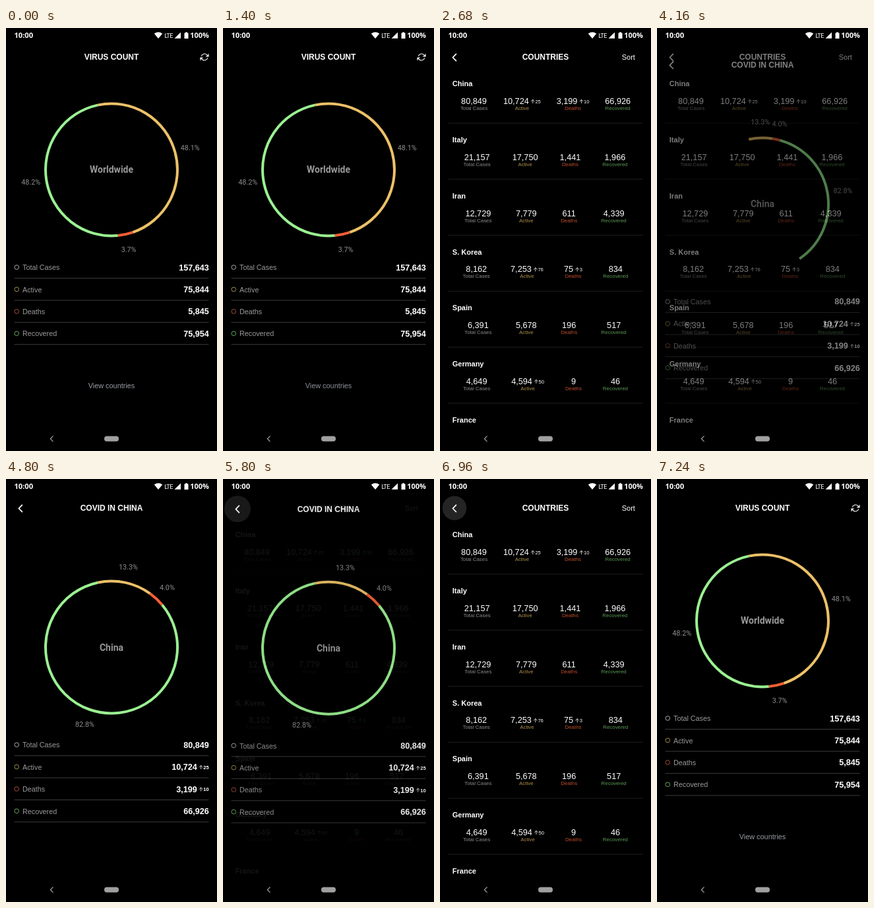
An HTML page for the animation above (9480 ms loop, 320 px wide and 640 px high).

```html
<!DOCTYPE html>
<html lang="en">
<head>
<meta charset="utf-8">
<title>Virus count</title>
<style>
  html, body { margin: 0; width: 100%; height: 100%; overflow: hidden; background: #000; }
  svg { display: block; width: 100vw; height: 100vh; }
  text { font-family: "Liberation Sans", Arial, sans-serif; white-space: pre; }
  .roboto { font-family: Roboto, sans-serif; }
  .status { font-family: "Open Sans", sans-serif; }
</style>
</head>
<body>
<svg id="stage" viewBox="0 0 320 640"></svg>
<script>
const LOOP = 9480;
const YELLOW = '#ecc168', RED = '#f65f34', GREEN = '#9bf192';
const START = -12, RADIUS = 100, LABEL_RADIUS = 123.7;
const SHIFT = 44;

const pen = document.createElement('canvas').getContext('2d');
const clamp = v => Math.max(0, Math.min(1, v));
const part = (t, from, length) => clamp((t - from) / length);
const smooth = v => v * v * (3 - 2 * v);
const mix = (a, b, v) => a + (b - a) * v;

function widthOf(str, size, weight = 400) {
  pen.font = `${weight} ${size}px "Liberation Sans", Arial, sans-serif`;
  return pen.measureText(str).width;
}

function text(str, x, y, size, o = {}) {
  const { fill = '#fff', anchor = 'start', weight = 400, cls = '', extra = '' } = o;
  return `<text x="${x}" y="${y}" font-size="${size}" font-weight="${weight}" fill="${fill}"
    text-anchor="${anchor}" class="${cls}" ${extra}>${str}</text>`;
}

const line = (y, color) => `<path d="M12.5 ${y}H307.5" stroke="${color}" stroke-width="1"/>`;
const stroke = (d, width, color = '#fff') =>
  `<path d="${d}" fill="none" stroke="${color}" stroke-width="${width}" stroke-linecap="round" stroke-linejoin="round"/>`;
const arrow = (x, y) => stroke(`M${x} ${y + 2.6}V${y - 2.6}M${x - 2.5} ${y - .1}L${x} ${y - 2.6}L${x + 2.5} ${y - .1}`, .9, '#ddd');
const title = str => text(str, 160, 48.3, 12, { anchor: 'middle', weight: 700 });
const back = id => `<circle id="${id}" cx="22" cy="44" r="0" fill="#fff"/>` + stroke('M24.4 39.3L19.4 44.5L24.4 49.7', 1.7);

// A number, optionally followed by a small arrow and its increase.
const DELTA = 7.6, ARROW_SPACE = 9.6;
function figure(str, x, y, size, weight) {
  const [num, inc] = str.split('+');
  const w = widthOf(num, size, weight);
  let out = text(num, x, y, size, { weight });
  if (inc) out += arrow(x + w + 6, y - 4) + text(inc, x + w + ARROW_SPACE, y - 1.2, DELTA, { weight });
  return out;
}
function figureWidth(str, size, weight) {
  const [num, inc] = str.split('+');
  return widthOf(num, size, weight) + (inc ? ARROW_SPACE + widthOf(inc, DELTA, weight) : 0);
}

// ----- summary with ring -----
const NAMES = ['Total Cases', 'Active', 'Deaths', 'Recovered'];
const DOTS = ['#a8a8a8', '#a09050', '#a44c38', '#66a860'];

function summary(name, values, top) {
  const rows = values.map((v, i) => {
    const y = top + i * 33.4;
    const w = figureWidth(v, 12.6, 700);
    return `<circle cx="16.2" cy="${y - .2}" r="3.3" fill="none" stroke="${DOTS[i]}" stroke-width="1"/>`
      + text(NAMES[i], 25, y + 4, 10.8, { fill: '#999' })
      + figure(v, 307.7 - w, y + 4.4, 12.6, 700)
      + line(y + 16.4, '#3c3c3c');
  }).join('');
  return rows + text(name, 160, top - 142.8, 14, { cls: 'roboto', weight: 700, fill: '#999', anchor: 'middle' });
}

function polar(cy, r, deg) {
  const a = deg * Math.PI / 180;
  return [160 + r * Math.sin(a), cy - r * Math.cos(a)];
}
const at = p => p.map(v => v.toFixed(2)).join(' ');

function arc(cy, from, to, color) {
  const big = to - from > 180 ? 1 : 0;
  return `<path d="M${at(polar(cy, RADIUS, from))}A${RADIUS} ${RADIUS} 0 ${big} 1 ${at(polar(cy, RADIUS, to))}"
    fill="none" stroke="${color}" stroke-width="4"/>`;
}

function ring(cy, shares, grown = 1) {
  if (grown <= 0) return '';
  let angle = START, out = '';
  const total = shares.reduce((sum, s) => sum + s[0], 0);
  for (const [share, color] of shares) {
    const next = angle + share / total * 360 * grown;
    const [x, y] = polar(cy, LABEL_RADIUS, (angle + next) / 2);
    out += arc(cy, angle, next, color)
      + text(share.toFixed(1) + '%', x, y + 3.6, 10.8, { cls: 'roboto', fill: '#8c8c8c', anchor: 'middle' });
    angle = next;
  }
  return out;
}

// ----- country list -----
const COUNTRIES = [
  ['China', '80,849', '10,724+25', '3,199+10', '66,926'],
  ['Italy', '21,157', '17,750', '1,441', '1,966'],
  ['Iran', '12,729', '7,779', '611', '4,339'],
  ['S. Korea', '8,162', '7,253+76', '75+3', '834'],
  ['Spain', '6,391', '5,678', '196', '517'],
  ['Germany', '4,649', '4,594+50', '9', '46'],
  ['France']
];
const TINTS = ['#8c8c8c', '#b0924a', '#c04c2c', '#5a9a54'];

function country([name, ...values], i) {
  const y = i * 84.75;
  let out = text(name, 18.8, y + 88.4, 11, { weight: 700 });
  if (values.length) {
    const widths = values.map((v, k) => Math.max(figureWidth(v, 12.7), widthOf(NAMES[k], 7.9)));
    const gap = (282 - widths.reduce((a, b) => a + b)) / 4;
    let x = 19 + gap / 2;
    values.forEach((v, k) => {
      const mid = x + widths[k] / 2;
      out += figure(v, mid - figureWidth(v, 12.7) / 2, y + 115.1, 12.7)
        + text(NAMES[k], mid, y + 124, 7.9, { fill: TINTS[k], anchor: 'middle' });
      x += widths[k] + gap;
    });
  }
  return `<g id="row${i}">${out}</g>` + line(y + 144, '#1e1e1e');
}

// ----- fixed system bars -----
const statusBar = text('10:00', 12.4, 14.9, 11.2, { cls: 'status', weight: 700 })
  + '<path d="M231 16L224.8 8.6Q231 4 237.2 8.6Z" fill="#fff"/>'
  + text('LTE', 240.2, 14.7, 9.2, { cls: 'roboto', extra: 'letter-spacing="-.6"' })
  + '<path d="M255.5 15.8H265V6.4Z" fill="#fff"/>'
  + '<path d="M270.5 7.4H272.2V6.2H274.8V7.4H276.5V16H270.5Z" fill="#fff"/>'
  + text('100%', 307.8, 14.9, 10.9, { cls: 'status', weight: 700, anchor: 'end' });
const navBar = stroke('M71.2 617.6L67.4 621.5L71.2 625.4', 1.3, '#989898')
  + '<rect x="149" y="617.6" width="22" height="7.8" rx="3.9" fill="#a0a0a0"/>';

const refresh = `<g transform="translate(294.4 37.4) scale(.55)">${stroke(
  'M23 4V10H17M1 20V14H7M3.51 9A9 9 0 0 1 18.36 5.64L23 10M1 14L5.64 18.36A9 9 0 0 0 20.49 15', 2)}</g>`;

const WORLD = [[48.1, YELLOW], [3.7, RED], [48.2, GREEN]];
const CHINA = [[13.3, YELLOW], [4.0, RED], [82.8, GREEN]];
const cover = '<rect width="320" height="640"/>';

document.getElementById('stage').innerHTML = `
  <rect width="320" height="640"/>
  <clipPath id="view"><rect width="320" height="603"/></clipPath>
  <g clip-path="url(#view)">
    <g>${title('VIRUS COUNT')}${refresh}${ring(214.4, WORLD)}
      ${summary('Worldwide', ['157,643', '75,844', '5,845', '75,954'], 362.2)}
      <g id="link">${text('View countries', 160, 545, 10.9, { fill: '#989ca4', anchor: 'middle' })}</g>
    </g>
    <g id="countries">${cover}${back('ripple1')}${title('COUNTRIES')}
      ${text('Sort', 285.8, 48, 11, { anchor: 'middle' })}
      <g id="loader">
        <path id="spinner" fill="none" stroke="#fff" stroke-width="3"/>
        ${text('Fetching latest updates', 160, 354.9, 10.83, { anchor: 'middle' })}
        ${text('Source: worldometers.info', 160, 368.4, 9.3, { fill: '#999', anchor: 'middle' })}
      </g>
      <g id="list">${COUNTRIES.map(country).join('')}</g>
    </g>
    <g id="detail">${cover}${back('ripple2')}${title('COVID IN CHINA')}
      <g id="chinaRing"></g>
      ${summary('China', COUNTRIES[0].slice(1), 402.3)}
    </g>
  </g>
  ${statusBar}${navBar}`;

const el = {};
for (const node of document.querySelectorAll('[id]')) el[node.id] = node;
const show = (node, on) => node.setAttribute('display', on ? 'inline' : 'none');

// Screens rise and fade in, then drop and fade out.
function screen(node, t, open, close) {
  const shown = t < close
    ? 1 - (1 - part(t, open, 350)) ** 5
    : 1 - part(t, close, 150) ** 4;
  const alpha = shown < .5 ? shown / 2
    : shown < .9 ? mix(.25, .7, (shown - .5) / .4)
    : mix(.7, 1, (shown - .9) / .1);
  show(node, shown > 0);
  node.setAttribute('opacity', alpha);
  node.setAttribute('transform', `translate(0 ${SHIFT * (1 - shown)})`);
}

function press(node, t, from) {
  const down = smooth(part(t, from - 20, 100)) - smooth(part(t, from + 90, 170));
  node.setAttribute('opacity', 1 - .6 * down);
}

function ripple(node, t, from) {
  const grow = part(t, from - 30, 180);
  node.setAttribute('r', 20 * Math.sqrt(grow));
  node.setAttribute('opacity', grow > 0 ? .14 * (1 - part(t, from + 120, 200)) : 0);
}

function spin(t) {
  const u = Math.max(0, t - 1380) / 1333;
  const turn = 45 + (t - 1680) * .23;
  const tail = turn + 270 * smooth(clamp(2 * u - 1));
  const head = turn + 6 + 270 * smooth(clamp(2.85 * u));
  const p = deg => at(polar(312, 13.3, deg));
  el.spinner.setAttribute('d', `M${p(tail)}A13.3 13.3 0 ${head - tail > 180 ? 1 : 0} 1 ${p(head)}`);
}

function draw(t) {
  screen(el.countries, t, 1600, 6940);
  screen(el.detail, t, 4080, 5740);
  press(el.link, t, 1400);
  press(el.row0, t, 3880);
  ripple(el.ripple2, t, 5640);
  ripple(el.ripple1, t, 6840);
  show(el.loader, t < 2360);
  show(el.list, t >= 2360);
  spin(t);
  el.chinaRing.innerHTML = ring(254.5, CHINA, 1 - (1 - part(t, 4063, 560)) ** 3);
}

const begin = performance.now();
function tick() {
  draw((performance.now() - begin) % LOOP);
  requestAnimationFrame(tick);
}
tick();
</script>
</body>
</html>
```
